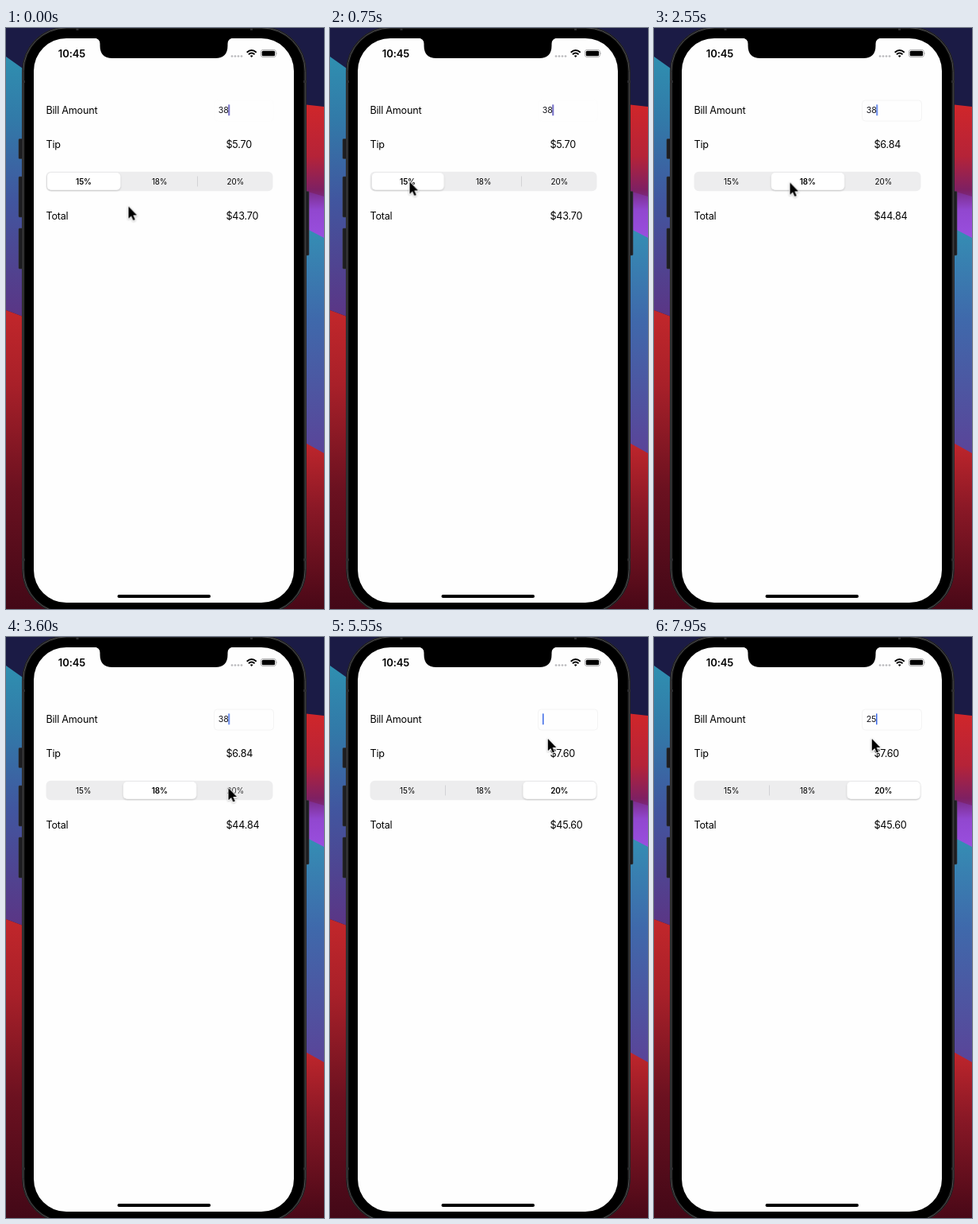
Write an HTML page that moves like this. It is 401 by 731 pixels and loops after 8000 ms.

```html
<!DOCTYPE html>
<html lang="en">
<head>
<meta charset="utf-8">
<title>Tip calculator</title>
<style>
html, body { margin: 0; width: 100%; height: 100%; overflow: hidden; background: #000; }
svg { display: block; width: 401px; height: 731px; }
text { font-family: Inter, Roboto, "Liberation Sans", sans-serif; fill: #000; }
.label { font-size: 12.6px; letter-spacing: -.22px; }
.seg { font-size: 9.9px; text-anchor: middle; letter-spacing: -.1px; }
.bold { font-weight: 600; }
.clock { font-size: 13px; font-weight: 600; letter-spacing: -.1px; }
.bill { font-size: 10.7px; fill: #16161c; }

/* every track holds its value until the next 150 ms tick */
.anim { animation: 8s step-end infinite; }
#cursor { animation-name: point; }
#pill { animation-name: slide; transform-box: fill-box; transform-origin: center; }
#caret { animation-name: blink, type, tint; }
#field { animation-name: outline; }
.low { animation-name: low; }
.mid { animation-name: mid; }
.high { animation-name: high; }
.press18 { animation-name: press18; }
.press20 { animation-name: press20; }
#d3 { animation-name: d3; }
#d8 { animation-name: d8; }
#d2 { animation-name: d2; }
#d5 { animation-name: d5; }

@keyframes point {
  0% { transform: translate(154.5px, 224.5px); }
  1.875% { transform: translate(150px, 222px); }
  3.75% { transform: translate(135px, 212px); }
  5.625% { transform: translate(117px, 201px); }
  7.5% { transform: translate(104px, 195px); }
  9.375% { transform: translate(100.5px, 193.5px); }
  13.125% { transform: translate(111px, 194px); }
  15% { transform: translate(130px, 194.5px); }
  16.875% { transform: translate(152px, 194.5px); }
  18.75% { transform: translate(166px, 194.5px); }
  20.625% { transform: translate(171.5px, 194.5px); }
  37.5% { transform: translate(179px, 194px); }
  39.375% { transform: translate(205px, 193px); }
  41.25% { transform: translate(240px, 191px); }
  43.125% { transform: translate(271px, 190px); }
  45% { transform: translate(280.5px, 190px); }
  56.25% { transform: translate(279px, 163px); }
  58.125%, 100% { transform: translate(274.7px, 128px); }
}
@keyframes slide {
  0% { transform: none; }
  9.375% { transform: scale(.985); }
  11.25% { transform: scale(.955); }
  13.125% { transform: scale(.98); }
  15% { transform: none; }
  28.125% { transform: translateX(58px); }
  30% { transform: translateX(92px); }
  31.875% { transform: translateX(95.7px); }
  46.875% { transform: translateX(153px); }
  48.75% { transform: translateX(190.5px) scale(.97); }
  50.625% { transform: translateX(191.4px) scale(.985); }
  52.5%, 100% { transform: translateX(191.4px); }
}
@keyframes blink {
  0%, 7.5%, 20.625%, 31.875%, 45%, 58.125%, 67.5%, 82.5%, 99.375%, 100% { opacity: 1; }
  1.875%, 5.625%, 13.125%, 18.75%, 26.25%, 30%, 37.5%, 43.125%, 50.625%, 56.25%,
  63.75%, 80.625%, 93.75%, 97.5% { opacity: .5; }
  3.75%, 15%, 28.125%, 39.375%, 52.5%, 65.625%, 76.875%, 95.625% { opacity: 0; }
}
@keyframes type {
  0% { transform: translateX(12.4px); }
  67.5% { transform: translateX(6.2px); }
  69.375% { transform: none; }
  82.5% { transform: translateX(6.2px); }
  86.25%, 100% { transform: translateX(12px); }
}
@keyframes tint { 0% { fill: #473fb4; } 11.25%, 100% { fill: #3a68e6; } }
@keyframes outline { 0% { stroke: #fdfdfd; } 11.25%, 100% { stroke: #f4f4f4; } }
@keyframes low { 0% { opacity: 1; } 28.125%, 100% { opacity: 0; } }
@keyframes mid { 0% { opacity: 0; } 28.125% { opacity: 1; } 46.875%, 100% { opacity: 0; } }
@keyframes high { 0% { opacity: 0; } 46.875%, 100% { opacity: 1; } }
@keyframes press18 { 0%, 28.125%, 100% { opacity: 1; } 26.25% { opacity: .75; } }
@keyframes press20 { 0%, 46.875%, 100% { opacity: 1; } 45% { opacity: .8; } }
@keyframes d3 { 0% { opacity: 1; } 69.375%, 100% { opacity: 0; } }
@keyframes d8 { 0% { opacity: 1; } 67.5%, 100% { opacity: 0; } }
@keyframes d2 { 0% { opacity: 0; } 82.5%, 100% { opacity: 1; } }
@keyframes d5 { 0% { opacity: 0; } 86.25%, 100% { opacity: 1; } }
</style>
</head>
<body>
<svg viewBox="0 0 401 731">
  <defs>
    <linearGradient id="blueL" x2="0" y2="1">
      <stop stop-color="#2f8fb0"/><stop offset=".25" stop-color="#3279a8"/>
      <stop offset=".55" stop-color="#41569f"/><stop offset="1" stop-color="#5b3585"/>
    </linearGradient>
    <linearGradient id="redL" x2="0" y2="1">
      <stop stop-color="#c2272b"/><stop offset=".25" stop-color="#a82029"/>
      <stop offset=".6" stop-color="#6b1120"/><stop offset="1" stop-color="#430817"/>
    </linearGradient>
    <linearGradient id="redR" x2="0" y2="1">
      <stop stop-color="#d0262a"/><stop offset=".55" stop-color="#b52338"/>
      <stop offset=".9" stop-color="#7f2062"/><stop offset="1" stop-color="#7a2a86"/>
    </linearGradient>
    <linearGradient id="violet" x2="0" y2="1">
      <stop stop-color="#7a2a86"/><stop offset=".4" stop-color="#9147cf"/><stop offset="1" stop-color="#9a4fe0"/>
    </linearGradient>
    <linearGradient id="blueR" x2="0" y2="1">
      <stop stop-color="#348fb4"/><stop offset=".4" stop-color="#3f69ab"/><stop offset="1" stop-color="#5b4398"/>
    </linearGradient>
    <linearGradient id="redB" x2="0" y2="1">
      <stop stop-color="#c0262c"/><stop offset=".4" stop-color="#8a1826"/><stop offset="1" stop-color="#480817"/>
    </linearGradient>
    <filter id="soft" x="-10%" y="-20%" width="120%" height="150%">
      <feDropShadow dx="0" dy="1" stdDeviation=".8" flood-opacity=".2"/>
    </filter>
    <filter id="lift" x="-30%" y="-20%" width="170%" height="150%">
      <feDropShadow dx="0" dy=".8" stdDeviation=".8" flood-opacity=".3"/>
    </filter>
  </defs>

  <!-- wallpaper -->
  <rect width="401" height="731" fill="#1b1b45"/>
  <path d="M0 36L24 53V364L0 355Z" fill="url(#blueL)"/>
  <path d="M0 355L24 364H80V731H0Z" fill="url(#redL)"/>
  <path d="M374 96L401 99V215H374Z" fill="url(#redR)"/>
  <path d="M374 204L401 212V266H374Z" fill="url(#violet)"/>
  <path d="M374 250L401 264V540H374Z" fill="url(#blueR)"/>
  <path d="M374 520L401 535V731H320V560Z" fill="url(#redB)"/>

  <!-- phone body -->
  <g fill="#1d1d20" stroke="#3a3a3d" stroke-width=".6">
    <rect x="16" y="139.500" width="6" height="25" rx="1.200"/>
    <rect x="16" y="187" width="6" height="51" rx="1.200"/>
    <rect x="16" y="252" width="6" height="51" rx="1.200"/>
    <rect x="377" y="205.500" width="5" height="80.500" rx="1.200"/>
  </g>
  <rect x="20.500" y="-1.500" width="358" height="739" rx="56" fill="#111" stroke="#262628"/>
  <rect x="21.800" y="-.2" width="355.400" height="736.400" rx="54.700" fill="none" stroke="#58585b" stroke-width=".9"/>
  <rect x="24" y="1.500" width="351" height="733" rx="52" fill="#000"/>
  <path d="M20 67.500H24M375 67.500H379M20 669H24M375 669H379M90 -1V3M309.500 -1V3" stroke="#2c2c2e" stroke-width="3"/>

  <!-- screen -->
  <rect x="35" y="13" width="328" height="710" rx="41" fill="#fefefe"/>
  <path d="M111 12.500Q118.500 13 118.500 20V22Q118.500 38 134 38H264Q279.500 38 279.500 22V20Q279.500 13 287 12.500Z"/>
  <rect x="140.500" y="713" width="117.500" height="4" rx="2"/>

  <!-- status bar -->
  <text class="clock" x="65.800" y="37">10:45</text>
  <g fill="#b9b9bc">
    <circle cx="285" cy="35.500" r="1.350"/><circle cx="289" cy="35.500" r="1.350"/>
    <circle cx="293" cy="35.500" r="1.350"/><circle cx="297" cy="35.500" r="1.350"/>
  </g>
  <g fill="none" stroke="#000" stroke-width="1.900">
    <path d="M303.700 30.800Q309.700 25.200 315.700 30.800"/>
    <path d="M305.900 33.300Q309.700 29.800 313.500 33.300"/>
  </g>
  <path d="M307.800 35Q309.700 33.400 311.600 35L309.700 37.100Z"/>
  <rect x="321.400" y="27.400" width="19" height="9.200" rx="2.700" fill="none" stroke="#9c9c9e" stroke-width=".8"/>
  <rect x="322.700" y="28.700" width="16.400" height="6.600" rx="1.500"/>
  <path d="M341.300 30.500Q342.700 32 341.300 33.600Z" fill="#9c9c9e"/>

  <!-- form -->
  <text class="label" x="50.500" y="108">Bill Amount</text>
  <text class="label" x="50.500" y="150.500">Tip</text>
  <text class="label" x="50.500" y="241">Total</text>

  <rect id="field" class="anim" x="262.500" y="91" width="75" height="26" rx="4" fill="none" stroke="#f4f4f4"/>
  <g class="bill">
    <text id="d3" class="anim bill" x="267.800" y="107">3</text>
    <text id="d8" class="anim bill" x="274.300" y="107">8</text>
    <text id="d2" class="anim bill" x="267.800" y="107">2</text>
    <text id="d5" class="anim bill" x="274.100" y="107">5</text>
  </g>
  <rect id="caret" class="anim" x="268" y="96.300" width="1.500" height="14" rx=".5"/>

  <rect x="50.500" y="180.700" width="286" height="24.600" rx="6" fill="#ededee"/>
  <path class="anim low" d="M241.500 186.500V199.500" stroke="#d2d2d5"/>
  <path class="anim high" d="M145.500 186.500V199.500" stroke="#d2d2d5"/>
  <rect id="pill" class="anim" x="52" y="182" width="92.300" height="21.800" rx="5" fill="#fff" filter="url(#soft)"/>

  <g class="anim low">
    <text class="seg bold" x="98" y="196.600">15%</text>
    <text class="seg anim press18" x="193.700" y="196.600">18%</text>
    <text class="seg" x="289.300" y="196.600">20%</text>
    <text class="label" x="277.500" y="150.500">$5.70</text>
    <text class="label" x="277.500" y="241">$43.70</text>
  </g>
  <g class="anim mid">
    <text class="seg" x="97.700" y="196.600">15%</text>
    <text class="seg bold" x="193.700" y="196.600">18%</text>
    <text class="seg anim press20" x="289.300" y="196.600">20%</text>
    <text class="label" x="277.500" y="150.500">$6.84</text>
    <text class="label" x="277.500" y="241">$44.84</text>
  </g>
  <g class="anim high">
    <text class="seg" x="97.700" y="196.600">15%</text>
    <text class="seg" x="193.700" y="196.600">18%</text>
    <text class="seg bold" x="289.300" y="196.600">20%</text>
    <text class="label" x="277.500" y="150.500">$7.60</text>
    <text class="label" x="277.500" y="241">$45.60</text>
  </g>

  <g id="cursor" class="anim">
    <path d="M0 0V15.200L3.500 12L5.900 17.500L8.300 16.500L5.900 11.100H10.600Z" stroke="#fff" stroke-width="1.800" stroke-linejoin="round" paint-order="stroke" filter="url(#lift)"/>
  </g>
</svg>
</body>
</html>
```
